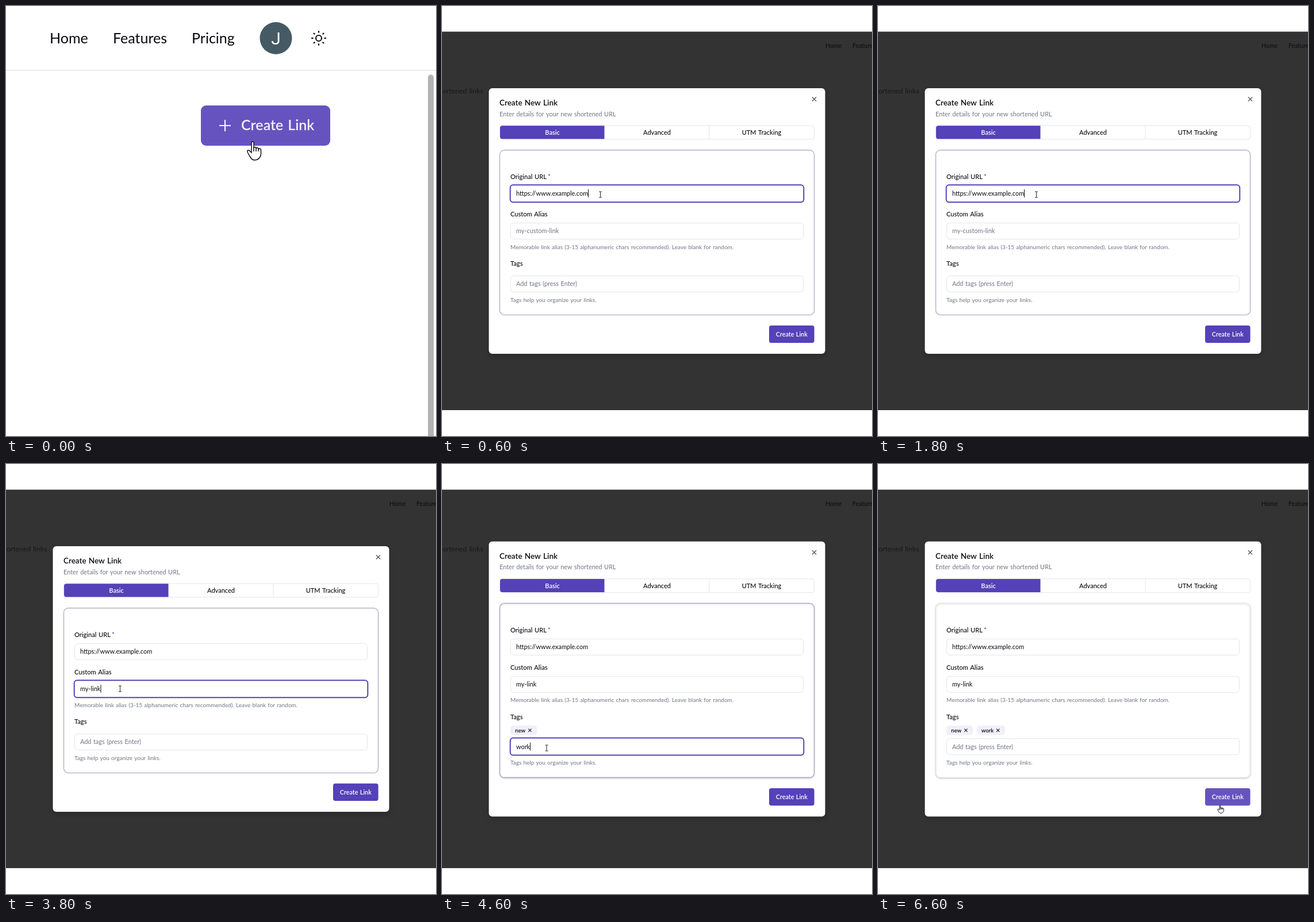
An HTML page with a canvas that plays this animation: 748x748 px, repeating every 8000 ms.

```html
<!DOCTYPE html>
<html lang="en">
<head>
<meta charset="utf-8">
<title>Create a link</title>
<style>
  html, body { margin: 0; width: 100%; height: 100%; overflow: hidden; background: #fff; }
  canvas { position: absolute; left: 0; top: 0; width: 748px; height: 748px; }
</style>
</head>
<body>
<canvas id="page" width="748" height="748"></canvas>
<canvas id="dialog" width="748" height="748"></canvas>
<script>
const LOOP = 8000;
const PURPLE = '#5541b8', HOVER = '#6753c0', INK = '#0b0b12', MUTED = '#6f7684', LINE = '#e5e5eb';
const page = document.getElementById('page');
const dialog = document.getElementById('dialog');
let ctx;

function box(x, y, w, h, r, fill, stroke, lineWidth = 1) {
  ctx.beginPath();
  ctx.roundRect(x, y, w, h, r);
  if (fill) { ctx.fillStyle = fill; ctx.fill(); }
  if (stroke) { ctx.strokeStyle = stroke; ctx.lineWidth = lineWidth; ctx.stroke(); }
}

function text(str, x, y, size, color = INK, weight = 400, align = 'left', family = 'Lato') {
  ctx.font = `${weight} ${size}px ${family}, sans-serif`;
  ctx.wordSpacing = size * 0.067 + 'px';
  ctx.textAlign = align;
  ctx.fillStyle = color;
  ctx.fillText(str, x, y);
}

// Each segment is [x1, y1, x2, y2].
function lines(color, width, ...segments) {
  ctx.beginPath();
  for (const [x1, y1, x2, y2] of segments) {
    ctx.moveTo(x1, y1);
    ctx.lineTo(x2, y2);
  }
  ctx.strokeStyle = color;
  ctx.lineWidth = width;
  ctx.stroke();
}

function cross(x, y, r, color, width) {
  lines(color, width, [x - r, y - r, x + r, y + r], [x - r, y + r, x + r, y - r]);
}

function shadowed(color, blur, dy, draw) {
  ctx.save();
  ctx.shadowColor = color;
  ctx.shadowBlur = blur;
  ctx.shadowOffsetY = dy;
  draw();
  ctx.restore();
}

const HAND = new Path2D('M8 20V3Q8 1 10 1Q12 1 12 3V12Q12 10.500 14 10.500Q16 10.500 16 13' +
  'Q16 11.500 18 11.500Q20 11.500 20 14.500Q20 13 22 13Q24.500 13 24.500 16V22Q24.500 26 22 29' +
  'Q19 33 13 33Q9 33 6 28L1.500 20Q0 17 2 16Q4 15.500 6 18Z');
const KNUCKLES = new Path2D('M12 11V18M16 12V18M20 14V18');

function hand(x, y, scale, lineWidth) {
  ctx.save();
  ctx.translate(x, y);
  ctx.scale(scale, scale);
  ctx.fillStyle = '#fff';
  ctx.strokeStyle = '#111';
  ctx.lineWidth = lineWidth;
  ctx.fill(HAND);
  ctx.stroke(HAND);
  ctx.stroke(KNUCKLES);
  ctx.restore();
}

function textCursor(x, y) {
  lines('#222', 1, [x, y - 4.5, x, y + 4.5], [x - 2.5, y - 5, x + 2.5, y - 5], [x - 2.5, y + 5, x + 2.5, y + 5]);
}

function drawPage() {
  ctx = page.getContext('2d');
  ctx.clearRect(0, 0, 748, 748);
  text('Home', 76, 65, 25);
  text('Features', 186, 65, 25);
  text('Pricing', 323, 65, 25);

  box(441.5, 28, 56, 56, 28, '#455a64');
  text('J', 469.5, 67, 30, '#fff', 400, 'center', 'Roboto');

  const rays = Array.from({ length: 8 }, (_, i) => {
    const c = Math.cos(i * Math.PI / 4), s = Math.sin(i * Math.PI / 4);
    return [544 + 9.5 * c, 56 + 9.5 * s, 544 + 12.8 * c, 56 + 12.8 * s];
  });
  lines('#15151c', 2.3, ...rays);
  box(539, 51, 10, 10, 5, null, '#15151c', 2.2);

  lines('#e4e4e7', 1.5, [0, 112, 748, 112]);
  box(734, 119.5, 10, 650, 5, '#b3b3b3');

  box(339, 173, 225, 70, 9, HOVER);
  lines('#f6f4fc', 2.2, [371, 208, 391, 208], [381, 198, 381, 218]);
  text('Create Link', 409, 216, 25, '#f3f0fb', 600);
  hand(419, 235, 1, 1.5);
}

function field(y, value, placeholder, focused) {
  if (focused) box(118.7, y - 0.8, 510.6, 30, 5, '#fff', PURPLE, 2);
  else box(119.5, y + 0.5, 509, 28, 5, '#fff', LINE);
  text(value || placeholder, 129, y + 18.3, 10.9, value ? INK : MUTED);
}

function chip(label, x, width) {
  box(x, 455, width, 16.5, 5, '#f1effa');
  text(label, x + 8, 467, 9.6, INK, 600);
  cross(x + width - 12.3, 463.2, 2.6, '#15151c', 1.1);
}

function drawDialog({ focus, alias, tag, chips, caret, cursor }) {
  ctx = dialog.getContext('2d');
  const grow = chips.length ? 8.2 : 0;
  const done = !focus;

  ctx.fillStyle = '#fff';
  ctx.fillRect(0, 0, 748, 748);
  ctx.fillStyle = '#333';
  ctx.fillRect(0, 44.6, 748, 658.4);
  text('Home', 667, 73.3, 10.6);
  text('Features', 714, 73.3, 10.6);
  text('shortened links', 71.5, 152.3, 12.3, '#15171b', 400, 'right');

  shadowed('rgba(0,0,0,.2)', 10, 4, () =>
    box(81.5, 143 - grow, 585, 462 + 2 * grow, 6, '#fff'));

  ctx.save();
  ctx.translate(0, -grow);
  text('Create New Link', 100, 173, 13.5, INK, 600);
  text('Enter details for your new shortened URL', 100, 191.5, 10.9, MUTED);
  cross(647.5, 162, 3.6, '#3c3c42', 1.2);

  box(100.5, 208, 547, 23.7, 4, '#fff', LINE);
  box(101, 208.3, 181.5, 23, [4, 0, 0, 4], PURPLE);
  lines(LINE, 1, [465, 208, 465, 232]);
  text('Basic', 192, 223.8, 11, '#fff', 600, 'center');
  text('Advanced', 374, 223.8, 11, INK, 500, 'center');
  text('UTM Tracking', 556, 223.8, 11, INK, 500, 'center');

  shadowed(chips.length ? 'rgba(0,0,0,.2)' : 'rgba(0,0,0,.06)', 3, 1, () =>
    box(100.5, 250.6, 547, 286.6 + 2 * grow, 8, '#fff', done ? '#e7e7ee' : '#aaa6c4', 1.1));

  text('Original URL', 119, 300.7, 11.1, INK, 500);
  text('*', 184, 300.7, 11.1, PURPLE, 500);
  field(312, 'https://www.example.com', '', focus === 'url');
  text('Custom Alias', 119, 366, 11.1, INK, 500);
  field(377, alias, 'my-custom-link', focus === 'alias');
  text('Memorable link alias (3-15 alphanumeric chars recommended). Leave blank for random.',
    119, 422.5, 10, MUTED);
  text('Tags', 119, 452, 11.1, INK, 500);
  ctx.restore();

  let x = 119;
  for (const [label, width] of chips) {
    chip(label, x, width);
    x += width + 6.6;
  }

  ctx.save();
  ctx.translate(0, grow);
  field(469, tag, 'Add tags (press Enter)', focus === 'tags');
  text('Tags help you organize your links.', 119, 514.5, 10, MUTED);
  box(569, 555.8, 78.6, 30.2, 4, done ? HOVER : PURPLE);
  text('Create Link', 608.3, 574.8, 10.8, '#fff', 600, 'center');
  ctx.restore();

  if (done) {
    hand(590.5, 593, 0.44, 2.2);
  } else {
    lines('#111', 1, [caret[0], caret[1] - 7, caret[0], caret[1] + 7]);
    textCursor(...cursor);
  }
}

const STEPS = [
  { until: 2600, focus: 'url', chips: [], caret: [254.5, 326], cursor: [275.5, 328] },
  { until: 4600, focus: 'alias', alias: 'my-link', chips: [], caret: [165, 391], cursor: [198.5, 391] },
  { until: 6600, focus: 'tags', alias: 'my-link', tag: 'work', chips: [['new', 46.2]],
    caret: [153.5, 491.5], cursor: [182, 494] },
  { until: LOOP, alias: 'my-link', chips: [['new', 46.2], ['work', 49.2]] }
];

const start = performance.now();

function frame() {
  const t = (performance.now() - start) % LOOP;
  const fading = t >= 500 && t < 600;
  page.style.opacity = t < 500 ? 1 : fading ? 0.65 : 0;
  dialog.style.opacity = t < 500 ? 0 : fading ? 0.24 : 1;
  if (t < 600) drawPage();
  if (t >= 500) drawDialog(STEPS.find(step => t < step.until));
  requestAnimationFrame(frame);
}
frame();
</script>
</body>
</html>
```
